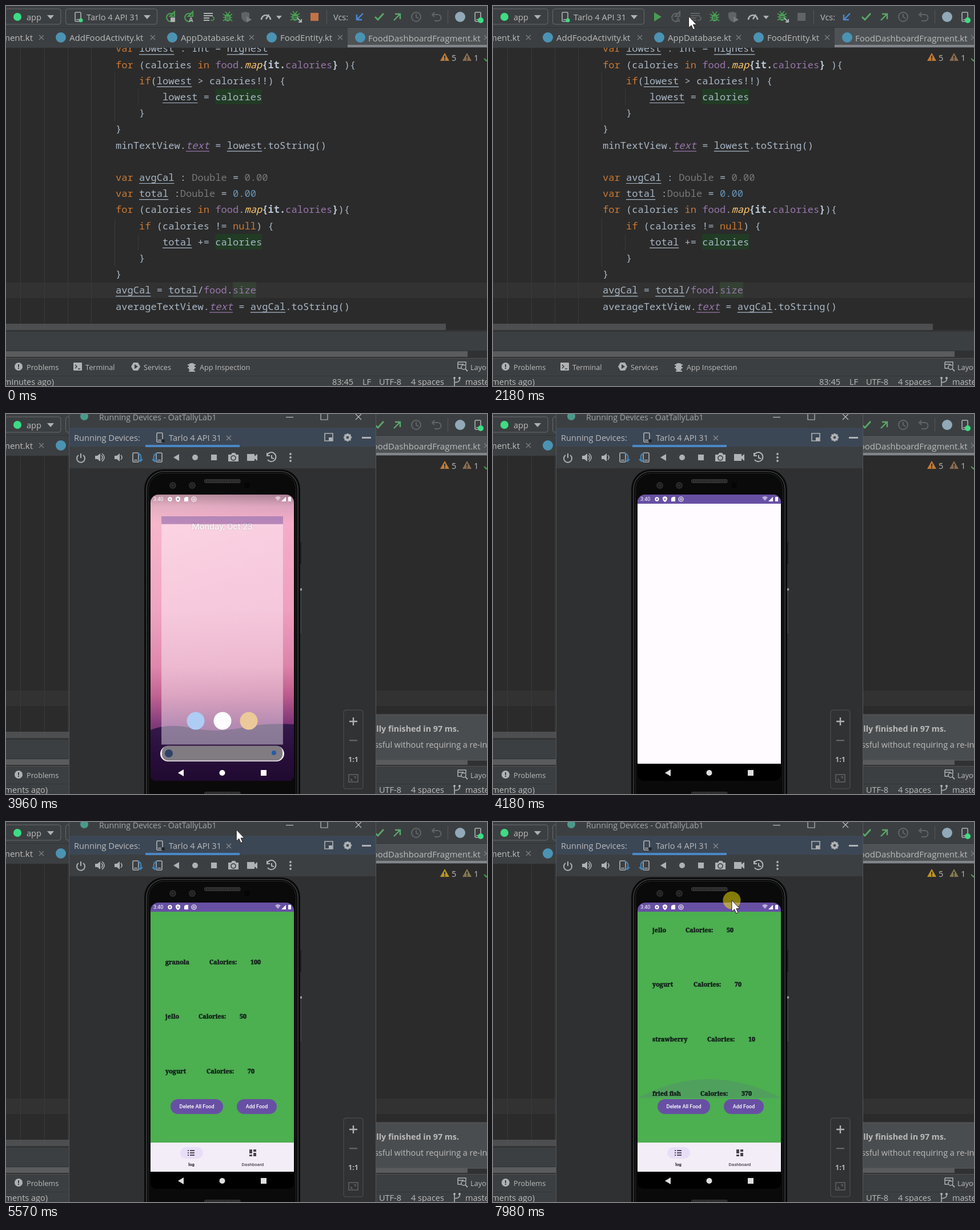
An HTML page with a canvas that plays this animation: 842x665 px, repeating every 8000 ms.

```html
<!DOCTYPE html>
<html lang="en">
<head>
<meta charset="utf-8">
<title>Calorie log demo</title>
<style>
html, body { margin: 0; width: 100%; height: 100%; overflow: hidden; background: #2b2b2b; }
canvas { display: block; }
</style>
</head>
<body>
<canvas id="stage" width="842" height="665"></canvas>
<script>
const ctx = document.getElementById('stage').getContext('2d');
const LOOP = 8000;
const UI = '"Open Sans", sans-serif', MONO = '"Noto Sans Mono", monospace';
const PHONE = 'Roboto, sans-serif', SLAB = '"Noto Serif", serif';
const PANEL = '#3c3f41', GRAY = '#afb1b3', DIM = '#616365', GREEN = '#499c54', BLUE = '#3d8ac7';
const PURPLE = '#6750a4', LABEL = '#bbbbbb';

// Drawing helpers
function rect(x, y, w, h, color, r = 0, line = 0) {
  ctx.beginPath();
  ctx.roundRect(x, y, w, h, r);
  paint(color, line);
}
function circle(x, y, r, color, line = 0) {
  ctx.beginPath();
  ctx.arc(x, y, r, 0, 7);
  paint(color, line);
}
function paint(color, line) {
  ctx.fillStyle = ctx.strokeStyle = color;
  ctx.lineWidth = line;
  line ? ctx.stroke() : ctx.fill();
}
function icon(d, x, y, color, line = 0) {
  const path = new Path2D(d);
  ctx.save();
  ctx.translate(x, y);
  ctx.fillStyle = ctx.strokeStyle = color;
  ctx.lineWidth = line;
  line ? ctx.stroke(path) : ctx.fill(path);
  ctx.restore();
}
function text(s, x, y, size = 14.6, color = LABEL, font = UI, style = '', align = 'left') {
  ctx.font = `${style} ${size}px ${font}`;
  ctx.textAlign = align;
  ctx.fillStyle = color;
  ctx.fillText(s, x, y);
}
const ramp = (t, a, b) => Math.min(1, Math.max(0, (t - a) / (b - a)));
const ease = p => p * p * (3 - 2 * p);
const cross = (x, y, r, color, w = 1.2) =>
  icon(`M${-r} ${-r}L${r} ${r}M${r} ${-r}L${-r} ${r}`, x, y, color, w);
const caret = (x, y) => icon('M-6-3H6L0 4Z', x, y, GRAY);
function gradient(colors, x0 = 0, y0 = 141, x1 = 0, y1 = 642) {
  const g = ctx.createLinearGradient(x0, y0, x1, y1);
  colors.forEach(([stop, color]) => g.addColorStop(stop, color));
  return g;
}

// Code: a letter before [..] selects a style
const STYLES = {
  k: { color: '#cc7832' }, u: { under: true }, p: { color: '#9876aa' },
  f: { color: '#ffc66d', style: 'italic' }, b: { style: 'bold', color: '#b9c5d2' },
  n: { color: '#6897bb' }, g: { color: '#787878' }, h: { back: '#213b24' },
  s: { color: '#9876aa', back: '#344134' }, i: { color: '#9876aa', style: 'italic', under: true }
};
const CODE = `k[var] u[lowest] : Int = u[highest]
k[for] (calories k[in] p[food].f[map]b[{it.]p[calories]b[}] ){
    k[if](u[lowest] > calories!!) {
        u[lowest] = h[calories]
    }
}
minTextView.i[text] = u[lowest].toString()

k[var] u[avgCal] : g[Double] = g[0.00]
k[var] u[total] :g[Double] = n[0.00]
k[for] (calories k[in] p[food].f[map]b[{it.]p[calories]b[}]){
    k[if] (calories != k[null]) {
        u[total] += h[calories]
    }
}
u[avgCal] = u[total]/p[food].s[size]
averageTextView.i[text] = u[avgCal].toString()`.split('\n');

function codeLine(line, y) {
  let x = 192;
  for (const part of line.split(/(\w\[[^\]]*\])/)) {
    const styled = /^\w\[/.test(part);
    const { color = '#a9b7c6', style = '', under, back } = styled ? STYLES[part[0]] : {};
    const s = styled ? part.slice(2, -1) : part;
    const width = s.length * 10.25;
    if (back) rect(x, y - 20, width, 27, back);
    text(s, x, y, 17.08, color, MONO, style);
    if (under) rect(x, y + 4, width, 1.2, color);
    x += width;
  }
}

function editor(t) {
  rect(0, 0, 842, 665, '#2b2b2b');
  rect(0, 484, 842, 27, '#323232');
  for (const x of [25, 67, 108, 149]) rect(x, 73, 1, 494, '#393939');
  for (const y of [117, 371]) {
    rect(190, y, 1, 85, '#393939');
    rect(231, y + 28, 1, 28, '#393939');
  }
  CODE.forEach((line, n) => codeLine(line, 80.3 + 28.2 * n));
  const amber = t < 4900 ? '#c27c33' : '#bd9420';
  [[768, amber, '5'], [807, t < 4900 ? '#8a6b50' : '#827850', '1']].forEach(([x, color, n]) => {
    icon('M0-8L8 6H-8Z', x, 90, color);
    rect(x - 1, 87, 2, 5, '#2b2b2b');
    rect(x - 1, 93, 2, 2, '#2b2b2b');
    text(n, x + 12, 95.5, 14.6);
  });
  icon('M0 0L4 4L12-6', 837, 92, GREEN, 2);
  rect(0, 556, 770, 11, '#4d4e4f');
}

function bug(x, y) {
  rect(x - 5, y - 5, 10, 13, GREEN, 5);
  icon('M-8-5L8 7M8-5L-8 7M-8 1H8M-4-9L0-4L4-9', x, y, GREEN, 1.6);
  rect(x - 3, y, 6, 1.3, PANEL);
  rect(x - 3, y + 3, 6, 1.3, PANEL);
}
function phoneIcon(x, y, color = GRAY) {
  rect(x - 5, y - 8, 10, 16, color, 1.5, 1.6);
  rect(x - 3, y + 4, 6, 1.5, color);
}

function toolbar(t) {
  rect(0, 0, 842, 73, PANEL);
  rect(0, 37, 842, 1, '#323435');
  rect(-6, 5, 102, 27, '#686b6d', 4, 1);
  circle(20, 19, 7, '#3ddc84');
  text('app', 36, 24.5);
  caret(78, 19);
  rect(104.5, 5, 160, 27, '#686b6d', 4, 1);
  phoneIcon(126, 19);
  circle(131, 25, 3.5, '#3ddc84');
  text('Tarlo 4 API 31', 141, 24.5);
  caret(247, 19);

  const running = t < 1760;
  if (t >= 1000 && t < 1690)
    rect(526, 5, 28, 28, t >= 1180 && t < 1240 ? '#5c6164' : '#4c5052', 4);
  if (t >= 2370 && t < 3140) rect(275, 5, 28, 28, t > 2600 && t < 2750 ? '#5c6164' : '#4c5052', 4);
  const loop = 'M5-5A7 7 0 1 0 6 4M7-10V-2H-1Z';
  if (running) {
    icon(loop, 288, 20, GREEN, 2.2);
    rect(288, 20, 8, 8, GRAY);
  } else icon('M-6-8L7 0L-6 8Z', 288, 19, t < 2800 ? GREEN : DIM);
  icon(loop, 320, 20, running ? GREEN : DIM, 2.2);
  text('A', 320, 28, 11, running ? GRAY : DIM, UI, 'bold');
  icon('M-8-6H8M-8-2H8M-8 2H2M-8 6H2', 354, 19, running ? GRAY : DIM, 2);
  icon('M4 6H7A3 3 0 0 0 7 0', 354, 19, running ? GREEN : DIM, 1.5);
  bug(388, 19);
  icon('M-8-7L-1-9L6-7V1Q4 7-1 9Q-7 6-8 0Z', 420, 19, DIM);
  icon('M0-1L9 5L0 10Z', 421, 19, '#77797b');
  icon('M-8 5A8 8 0 1 1 8 5M0 4L5-4', 455, 19, GRAY, 2.6);
  icon('M-5-2H5L0 4Z', 478, 19, GRAY);
  bug(506, 18);
  icon('M2 2L9 9M9 4V9H4', 508, 19, GRAY, 2);
  rect(533, 12, 14, 14, running ? (t < 1000 ? '#c57345' : '#c75450') : DIM);
  rect(561, 7, 1, 24, '#555759');
  text('Vcs:', 573, 24.5);
  icon('M6-6L-5 5M-5-4V5H4', 619, 19, '#4a88d6', 2.4);
  icon('M-7 0L-2 5L8-6', 653, 19, '#59a869', 2.8);
  icon('M-6 6L5-5M-4-5H5V4', 685, 19, '#59a869', 2.4);
  circle(718, 19, 8, DIM, 2);
  icon('M0-5V0L4 3', 718, 19, DIM, 2);
  icon('M-3-8L-7-4L-3 0M-7-4H3A5 5 0 0 1 3 7H-3', 753, 19, DIM, 2);
  rect(773, 7, 1, 24, '#555759');
  circle(795, 19, 9, '#91a9b8');
  phoneIcon(826, 19);
  circle(831, 25, 5, '#3ddc84');

  rect(598, 38, 244, 35, '#4e5254');
  rect(598, 68, 244, 4, '#82868a');
  text('ment.kt', 47, 61, 15, LABEL, UI, '', 'right');
  [[96, 'AddFoodActivity.kt'], [291, 'AppDatabase.kt'], [465, 'FoodEntity.kt'],
   [620, 'FoodDashboardFragment.kt']].forEach(([x, name], i) => {
    circle(x, 55, 9, '#4b93b3');
    text(name, x + (i == 3 ? 14 : 15), i == 3 ? 62 : 61, 15);
  });
  for (const x of [62, 257, 430, 585, 841]) cross(x, 55, 4, '#7d8082');
}

function bottomBars(t) {
  rect(0, 567, 842, 98, PANEL);
  rect(0, 567, 842, 3, '#323435');
  rect(0, 603, 842, 13, '#2f3133');
  rect(0, 604, 808, 10, '#595b5d');
  rect(0, 616, 842, 1, '#515355');
  rect(0, 647, 842, 1, '#333537');

  circle(22, 631, 7, GRAY);
  rect(21, 627, 2, 5, PANEL);
  rect(21, 633, 2, 2, PANEL);
  text('Problems', 36, 637, 12.7);
  rect(118, 624, 15, 14, GRAY, 1);
  icon('M-4-3L-1 0L-4 3M1 4H5', 125, 631, PANEL, 1.5);
  text('Terminal', 139, 637, 12.7);
  icon('M-4-7H4L8 0L4 7H-4L-8 0Z', 227, 631, GRAY);
  icon('M-2-4L4 0L-2 4Z', 227, 631, PANEL);
  text('Services', 241, 637, 12.7);
  rect(320, 625, 10, 13, GRAY, 4);
  icon('M-7-2H7M-7 3H7M-5 9H6', 325, 630, GRAY, 2);
  text('App Inspection', 339, 637, 12.7);
  icon('M-7-7H7V-1M-7-7V4H-1M-7-3H3', 798, 630, GRAY, 1.5);
  circle(801, 632, 4, GRAY, 1.5);
  icon('M3 3L7 7', 801, 632, GRAY, 1.8);
  text('Layout Inspector', 813, 637, 12.7);

  const building = t >= 2500 && t < 3540;
  if (t < 700) text('minutes ago)', 84, 663, 14.5, LABEL, UI, '', 'right');
  else if (building) text('Lab2 (moments ago)', 141, 663, 14.5, LABEL, UI, '', 'right');
  else if (t >= 1900) text('moments ago)', 73, 663, 14.5, LABEL, UI, '', 'right');
  if (building) {
    text('Module Build Running', 335, 663, 14.2, LABEL, UI, '', 'right');
    rect(345, 655, 187, 5, '#5b5e60', 2.5);
    rect(345, 655, t < 3140 ? 125 : t < 3370 ? 187 : 40, 5, '#7b7e80', 2.5);
    circle(547, 658, 7, '#73777a');
    cross(547, 658, 3, PANEL);
  }
  text('83:45', 571, 663, 14.5);
  text('LF', 624, 663, 14.5);
  text('UTF-8', 653, 663, 14.5);
  text('4 spaces', 709, 663, 14.5);
  icon('M-4-6V8M5-6V-3Q5 1-4 2', 789, 657, GRAY, 1.6);
  circle(785, 651, 2, GRAY);
  circle(794, 651, 2, GRAY);
  text('master', 804, 663, 14.5);
}

function balloon() {
  rect(500, 526, 350, 80, '#4a4d4f');
  rect(500, 526, 350, 80, '#5a5d5f', 0, 1);
  text('Launch successfully finished in 97 ms.', 793, 556, 14.3, LABEL, UI, 'bold', 'right');
  text('ssful without requiring a re-install', 645, 584, 14.4);
}

function deviceWindow() {
  rect(111, -5, 536, 675, '#2e3032');
  rect(111, 0, 536, 95, PANEL);
  rect(111, 24, 536, 33, '#3c4755');
  circle(137, 4, 7, '#4a9a8c');
  text('Running Devices - OatTallyLab1', 163, 11, 14.2, '#a2a4a6');
  rect(490, 5, 13, 1.2, LABEL);
  rect(551, -3, 12, 13, LABEL, 0, 1.2);
  cross(617, 5, 5, LABEL);
  text('Running Devices:', 119, 47);
  phoneIcon(269, 41);
  circle(275, 47, 3, '#20262a');
  text('Tarlo 4 API 31', 285, 47);
  cross(390, 42, 4, '#8b8e90');
  rect(244, 54, 165, 4, '#4a88c7');
  rect(558, 34, 14, 13, GRAY, 0, 1.6);
  rect(565, 41, 6, 6, GRAY);
  gear(598, 41, 5.2, 3.5);
  rect(623, 40, 16, 3, GRAY);

  icon('M-4-5A7 7 0 1 0 4-5M0-8V0', 131, 77, GRAY, 2);
  for (const [x, loud] of [[163, 1], [197, 0]]) {
    icon('M-7-3H-3L2-7V7L-3 3H-7Z', x, 76, GRAY);
    icon(loud ? 'M4-4Q8 0 4 4M5-7Q13 0 5 7' : 'M4-4Q8 0 4 4', x, 76, GRAY, 1.6);
  }
  phoneIcon(227, 76);
  icon('M4-7Q12-5 8 6M4 4L8 7L12 3', 227, 76, BLUE, 2);
  phoneIcon(268, 76);
  icon('M-4-7Q-12-5-8 6M-4 4L-8 7L-12 3', 268, 76, BLUE, 2);
  icon('M5-6V6L-5 0Z', 298, 76, GRAY);
  circle(331, 76, 5, GRAY);
  rect(359, 71, 10, 10, GRAY);
  icon('M-9-5H-4L-2-8H3L5-5H9V7H-9Z', 398, 76, GRAY);
  circle(398, 77, 4, PANEL, 1.6);
  icon('M-9-6H4V-2L9-6V6L4 2V6H-9Z', 431, 76, GRAY);
  icon('M-8-4A8 8 0 1 1-7 4M-8-8V-3H-3M0-4V1L4 2', 465, 76, GRAY, 2);
  for (const y of [70, 76, 82]) circle(498, y, 1.9, GRAY);

  rect(591, 518, 34, 138, '#303234', 4);
  rect(591, 518, 34, 138, '#505254', 4, 1);
  icon('M-7 0H7M0-7V7', 608, 538, GRAY, 2.4);
  rect(601, 570, 14, 2.4, DIM);
  text('1:1', 608, 609, 12.5, GRAY, UI, 'bold', 'center');
  rect(600, 631, 16, 13, DIM, 0, 1.5);
  icon('M1-3H4V0M-4 0V3H-1', 608, 638, DIM, 1.5);
  rect(110, 0, 1, 665, '#555759');
  rect(647, 0, 1, 665, '#555759');
}
function gear(x, y, r, tooth) {
  for (let a = 0; a < 6.2; a += Math.PI / 4)
    circle(x + Math.cos(a) * r, y + Math.sin(a) * r, tooth * .6, GRAY);
  circle(x, y, r * .75, GRAY, r * .6);
}

function phoneBody() {
  rect(515, 224, 2, 38, '#1d1e1f');
  rect(515, 306, 2, 78, '#3e4042');
  rect(515, 305, 3, 4, '#9a9c9e');
  rect(242, 97, 273, 600, '#0a0a0a', 34);
  rect(246, 100.5, 265, 600, '#4c4e50', 31, 1.2);
  rect(249.5, 103.5, 258, 600, '#242526', 28, 1);
  for (const y of [114, 661]) {
    rect(347, y, 64, 7, '#353535', 3);
    for (let x = 349; x < 410; x += 3) rect(x, y + 1, 1, 5, '#191919');
  }
  for (const x of [292, 326]) {
    circle(x, 125, 6, '#2b2b2b');
    circle(x, 125, 3, '#111', 1);
  }
  circle(422, 125, 5, '#050505');
}

function home() {
  rect(253, 141, 251, 501, gradient([[0, '#86657b'], [.04, '#d19cb9'], [.1, '#f3abc9'],
    [.4, '#eea0bf'], [.6, '#dc82a8'], [.7, '#bd5c8c'], [.8, '#7d3677'], [1, '#321650']]));
  // Soft light from the upper left
  rect(253, 141, 251, 501, gradient([[0, 'rgba(255,200,205,.4)'], [1, 'rgba(225,140,190,0)']],
    253, 190, 440, 500));
  icon('M0 9Q30-4 75 6Q115 14 160 5Q200-4 251-1V120H0Z', 253, 544,
    gradient([[.8, '#351a4c'], [.9, '#290f3d'], [1, '#200a30']], 0, -403, 0, 98));
  ctx.shadowColor = '#555a';
  ctx.shadowBlur = 3;
  text('Monday, Oct 23', 378.5, 202, 15.5, '#fff', PHONE, '', 'center');
  ctx.shadowBlur = 0;
  [[332, '#6fa8ea'], [379, '#ffffff'], [425, '#dca24c']].forEach(([x, c]) => circle(x, 537, 15.5, c));
  rect(270, 581, 217, 27, '#f1e9f1', 13.5);
}

function searchBar(dimmed) {
  if (dimmed) rect(273, 580.5, 211, 26, '#817b82', 11);
  circle(285, 594, 7, dimmed ? '#2f4166' : '#4285f4');
  circle(469, 593, 4, dimmed ? '#2a5aa8' : '#4285f4');
}

function appBackground() {
  rect(253, 141, 251, 16, PURPLE);
  rect(253, 157, 251, 455, '#fffbff');
}

const FOODS = [['granola', 356, 100], ['jello', 337, 50], ['yogurt', 351, 70],
  ['strawberry', 375, 10], ['fried fish', 363, 370]];

function slab(s, x, y) {
  text(s, x, y, 10.8, '#12201a', SLAB, '900');
  ctx.strokeStyle = '#12201a';
  ctx.lineWidth = .5;
  ctx.strokeText(s, x, y);
}

function foodLog(t) {
  rect(253, 157, 251, 405, '#4caf50');
  ctx.save();
  ctx.beginPath();
  ctx.rect(253, 157, 251, 326);
  ctx.clip();
  const scroll = 105 * ease(ramp(t, 6950, 7300)) + 46.5 * ease(ramp(t, 7450, 7800));
  const glow = ramp(t, 7750, 7970);
  if (glow) icon(`M0 0Q125.5 ${-66 * glow} 251 0Z`, 253, 483, 'rgba(103,80,164,.16)');
  FOODS.forEach(([name, x, calories], i) => {
    const y = 248.5 + 95.5 * i - scroll;
    slab(name, 279, y);
    slab('Calories:', x, y);
    slab(calories, x + 72, y);
  });
  ctx.restore();
  rect(288, 485, 92, 26, PURPLE, 13);
  text('Delete All Food', 334, 501.3, 9, '#fff', PHONE, '500', 'center');
  rect(404, 485, 70, 26, PURPLE, 13);
  text('Add Food', 439, 501.3, 9, '#fff', PHONE, '500', 'center');
  rect(253, 561, 251, 51, '#f3edf7');
  rect(305, 569, 40, 20, '#e8def8', 10);
  icon('M-2-4H6M-2 0H6M-2 4H6M-6-4H-4M-6 0H-4M-6 4H-4', 324, 579, '#1d192b', 1.4);
  text('log', 324.5, 602, 7.6, '#1d192b', PHONE, 'bold', 'center');
  icon('M-6-6H-1V1H-6ZM1-6H6V-2H1ZM-6 3H-1V6H-6ZM1 0H6V6H1Z', 432, 579, '#49454f');
  text('Dashboard', 432, 602, 8, '#49454f', PHONE, '500', 'center');
}

function screen(t) {
  ctx.save();
  ctx.beginPath();
  ctx.roundRect(253, 141, 251, 501, [14, 14, 10, 10]);
  ctx.clip();
  if (t < 4300) {
    home();
    searchBar(t >= 3900);
  }
  if (t >= 3900) {
    const scale = .8 + .2 * ramp(t, 3900, 4155);
    ctx.save();
    ctx.globalAlpha = ramp(t, 4000, 4140);
    rect(253, 612, 251, 30, '#000');
    ctx.globalAlpha = ramp(t, 3900, 4040);
    ctx.translate(378.5, 391.5);
    ctx.scale(scale, scale);
    ctx.translate(-378.5, -391.5);
    appBackground();
    ctx.restore();
  }
  if (t >= 5400) foodLog(t);
  text('3:40', 258, 152.3, 9, '#fff', PHONE);
  circle(287, 149, 2.6, '#fff', 2.2);
  icon('M-4-3L0-5L4-3V0Q3 4 0 5Q-3 4-4 0Z', 301, 149, '#fff');
  circle(301, 149, 1.3, PURPLE);
  icon('M-3-2L0-4H4V4H-3Z', 315, 149, '#fff');
  circle(329, 149, 4, '#fff', 1.2);
  circle(329, 149, 1.5, '#fff', 1);
  icon('M-5-2Q0-6 5-2L0 4Z', 476, 148, '#ffffff88');
  icon('M-4 4L4-4V4Z', 486, 149, '#fff');
  rect(494, 145, 5, 8, '#fff', 1);
  const nav = t < 4000 ? '#fff' : '#dedede';
  icon('M5-6V6L-5 0Z', 306, 628, nav);
  circle(378.5, 628, 5, nav);
  rect(446, 623, 10, 10, nav);
  ctx.restore();
}

// Pointer keys: time, x, y
const PATH = [[0, 722, 690], [310, 722, 675], [1080, 539, 26], [1630, 539, 26], [2410, 291, 16],
  [3540, 291, 16], [3840, 400, -30], [4900, 400, -30], [5260, 427, -4], [5700, 397, 18],
  [6440, 397, 19], [6750, 391, 262], [6950, 391, 255], [7300, 402, 180], [7450, 402, 180],
  [7970, 418, 137], [LOOP, 418, 137]];

function pointer(t) {
  const i = PATH.findIndex(key => key[0] > t);
  const [t0, x0, y0] = PATH[i - 1], [t1, x1, y1] = PATH[i];
  const p = ease(ramp(t, t0, t1));
  const x = x0 + (x1 - x0) * p, y = y0 + (y1 - y0) * p;
  if (t >= 5910 && t < 6280 || t >= 6940) circle(x, y, 15.5, 'rgba(255,240,0,.5)');
  const arrow = 'M0 0V20L4.6 15.8L7.8 23L11 21.6L7.9 14.6H14Z';
  icon(arrow, x, y, '#fff');
  icon(arrow, x, y, '#222', 1);
}

function frame(now) {
  const t = now % LOOP;
  editor(t);
  toolbar(t);
  bottomBars(t);
  if (t >= 3700) balloon();
  if (t >= 3540) {
    ctx.globalAlpha = ramp(t, 3520, 3660);
    deviceWindow();
    phoneBody();
    screen(t);
    ctx.globalAlpha = 1;
  }
  pointer(t);
  requestAnimationFrame(frame);
}
requestAnimationFrame(frame);
</script>
</body>
</html>
```
